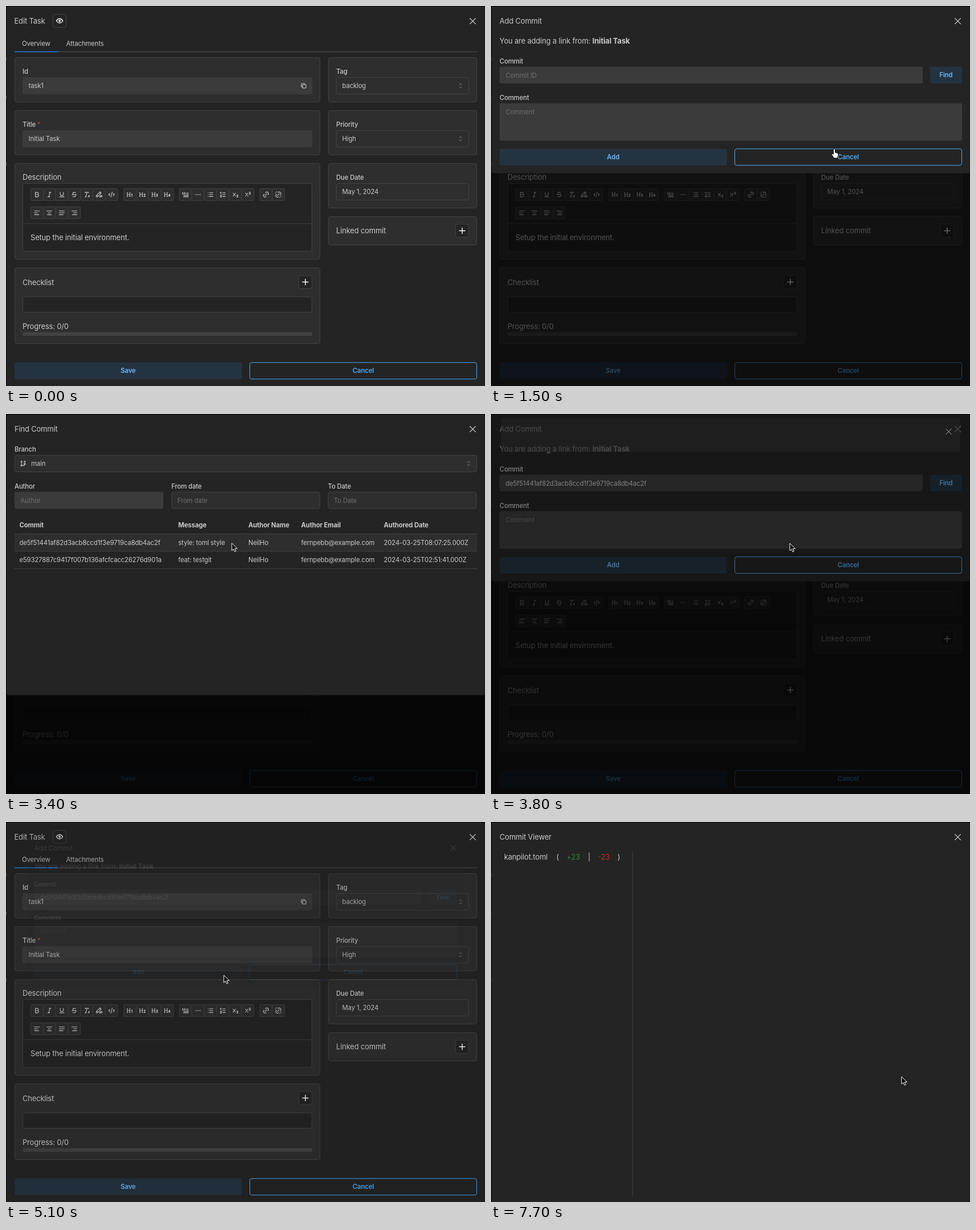
An HTML page for the animation above (8 s loop, 840 by 667 pixels).

```html
<!DOCTYPE html>
<html lang="en">
<head>
<meta charset="utf-8">
<title>Link a commit to a task</title>
<style>
  html, body { margin: 0; width: 100%; height: 100%; overflow: hidden; background: #0b0b0b; }
  svg { display: block; width: 100vw; height: 100vh; }
  text { font-family: Inter, sans-serif; letter-spacing: -.01em; white-space: pre; }
  .icon { fill: none; stroke-linecap: round; stroke-linejoin: round; }
  .btn rect { fill: #243341; }
  .btn.hover rect { fill: #24384b; }
  .btn.down { transform: translateY(1px); }
</style>
</head>
<body>
<svg id="stage" viewBox="0 0 840 667" preserveAspectRatio="none"></svg>
<script>
const C = { panel: '#242424', card: '#2e2e2e', field: '#3b3b3b', line: '#424242',
            text: '#c9c9c9', hint: '#6e6e6e', blue: '#4dabf7', sky: '#6bb7fa' };
const MD = 12.9, SM = 11.3;
const HASH = 'de5f51441af82d3acb8ccd1f3e9719ca8db4ac2f';

// Icons on a 24 unit grid
const H = 'M4 6v12M12 6v12M11 18h2M3 18h2M4 12h8M3 6h2M11 6h2';
const X = 'M5 7l8 10m-8 0l8-10';
const LINK = 'M9 15l6-6M11 6l.46-.54a5 5 0 0 1 7.07 7.07L18 13M13 18l-.4.53a5 5 0 0 1-7.07-7.07L6 11';
const ICONS = {
  bold: 'M7 5h6a3.5 3.5 0 0 1 0 7h-6zM13 12h1a3.5 3.5 0 0 1 0 7h-7v-7',
  italic: 'M11 5h6M7 19h6M14 5l-4 14',
  underline: 'M7 5v5a5 5 0 0 0 10 0v-5M5 19h14',
  strike: 'M5 12h14M16 6.5a4 2 0 0 0-4-1.5h-1a3.5 3.5 0 0 0 0 7h2a3.5 3.5 0 0 1 0 7h-1.5a4 2 0 0 1-4-1.5',
  clear: 'M17 15l4 4m0-4l-4 4M7 6V5h11v1M7 19h4M13 5L9 19',
  marker: 'M3 19h4L17.5 8.5a2.8 2.8 0 1 0-4-4L3 15zM12.5 5.5l4 4M4.5 13.5l4 4M21 15v4h-8l4-4z',
  code: 'M7 8l-4 4 4 4M17 8l4 4-4 4M14 4l-4 16',
  h1: H + 'M19 18v-8l-2 2',
  h2: H + 'M17 12a2 2 0 1 1 4 0c0 .6-.4 1-.8 1.6L17 18h4',
  h3: H + 'M19 14a2 2 0 1 0-2-2M17 16a2 2 0 1 0 2-2',
  h4: H + 'M20 18v-8l-4 6h5',
  quote: 'M6 15h15M21 19H6M15 11h6M21 7h-6M9 9h1a1 1 0 1 1-1 1V7.5a2 2 0 0 1 2-2M3 9h1a1 1 0 1 1-1 1V7.5a2 2 0 0 1 2-2',
  dash: 'M4 12h3M17 12h3M10.5 12h3',
  list: 'M9 6h11M9 12h11M9 18h11M5 6v.01M5 12v.01M5 18v.01',
  numbers: 'M11 6h9M11 12h9M12 18h8M4 16a2 2 0 1 1 4 0c0 .6-.5 1-1 1.5L4 20h4M6 10V4L4 6',
  sub: X + 'M21 20h-4l3.5-4a1.73 1.73 0 0 0-3.5-2',
  sup: X + 'M21 11h-4l3.5-4a1.73 1.73 0 0 0-3.5-2',
  link: LINK,
  unlink: LINK + 'M17 22v-2M20 17h2M2 7h2M7 2v2',
  left: 'M4 6h16M4 12h10M4 18h14',
  center: 'M4 6h16M8 12h8M6 18h12',
  justify: 'M4 6h16M4 12h16M4 18h12',
  right: 'M4 6h16M10 12h10M6 18h14',
  eye: 'M10 12a2 2 0 1 0 4 0a2 2 0 1 0-4 0M21 12q-3.6 6-9 6t-9-6q3.6-6 9-6t9 6',
  close: 'M18 6L6 18M6 6l12 12',
  plus: 'M12 5v14M5 12h14',
  copy: 'M8 10a2 2 0 0 1 2-2h8a2 2 0 0 1 2 2v8a2 2 0 0 1-2 2h-8a2 2 0 0 1-2-2zM16 8V6a2 2 0 0 0-2-2H6a2 2 0 0 0-2 2v8a2 2 0 0 0 2 2h2',
  select: 'M8 9l4-4 4 4M16 15l-4 4-4-4',
  branch: 'M5 18a2 2 0 1 0 4 0a2 2 0 1 0-4 0M5 6a2 2 0 1 0 4 0a2 2 0 1 0-4 0M15 6a2 2 0 1 0 4 0a2 2 0 1 0-4 0M7 8v8M9 18h6a2 2 0 0 0 2-2v-5M14 14l3-3 3 3',
  trash: 'M4 7h16M10 11v6M14 11v6M5 7l1 12a2 2 0 0 0 2 2h8a2 2 0 0 0 2-2l1-12M9 7V4a1 1 0 0 1 1-1h4a1 1 0 0 1 1 1v3',
  user: 'M3 12a9 9 0 1 0 18 0a9 9 0 1 0-18 0M9 10a3 3 0 1 0 6 0a3 3 0 1 0-6 0M6.2 18.8A4 4 0 0 1 10 16h4a4 4 0 0 1 3.8 2.8',
  empty: 'M13 9c4-.3 7-1.5 7-3 0-1.7-3.6-3-8-3-2 0-3.8.3-5.2.7M4.5 5C4.2 5.3 4 5.7 4 6c0 1.2 1.9 2.3 4.7 2.7M4 6v6c0 1.7 3.6 3 8 3l3-.2M19 13.3l1-1.3V6M4 12v6c0 1.7 3.6 3 8 3 3.2 0 6-.7 7.2-1.7M3 3l18 18'
};

// Drawing helpers; text is placed by its vertical middle
const text = (x, y, s, { size = SM, fill = C.text, weight = 400, anchor = 'start' } = {}) =>
  `<text x="${x}" y="${y + size * .36}" font-size="${size}" fill="${fill}" font-weight="${weight}" text-anchor="${anchor}">${s}</text>`;
const big = (x, y, s, fill) => text(x, y, s, { size: MD, fill });
const label = (x, y, s) => text(x, y, s, { weight: 500 });
const hint = (x, y, s) => text(x, y, s, { fill: C.hint });
const rect = (x, y, w, h, fill, stroke = 'none', r = 3.5) =>
  `<rect x="${x}" y="${y}" width="${w}" height="${h}" rx="${r}" fill="${fill}" stroke="${stroke}"/>`;
const bar = (x, y, w, h, fill = C.line) => rect(x, y, w, h, fill, 'none', 0);
const icon = (name, x, y, size, color = C.text, width = 1.1) =>
  `<path class="icon" d="${ICONS[name]}" stroke="${color}" stroke-width="${width * 24 / size}" transform="translate(${x - size / 2} ${y - size / 2}) scale(${size / 24})"/>`;
const group = (id, body, cls = '') => `<g id="${id}" class="${cls}">${body}</g>`;

const card = (x, y, w, h) => rect(x + .5, y + .5, w - 1, h - 1, C.card, C.line);
const well = (x, y, w, h) => rect(x + .5, y + .5, w - 1, h - 1, C.panel, C.line);
const field = (x, y, w, h = 30) => rect(x, y, w, h, C.field);
const action = (name, x, y, size = 17) =>
  rect(x - 11.5, y - 11.5, 23, 23, C.panel, C.line) + icon(name, x, y, size, '#fff', 1.4);
const closeX = icon('close', 818.5, 26.5, 20);
const select = (x, y, w, s, pad = 10.5) => card(x, y, w, 30) + text(x + pad, y + 15, s) +
  icon('select', x + w - 15, y + 15, 13, '#868686', 1);
const button = (id, x, y, w, s) => group(id,
  rect(x, y, w, 29.5, '', 'none') +
  text(x + w / 2, y + 14.8, s, { fill: C.sky, weight: 600, anchor: 'middle' }), 'btn');
const cancel = y => rect(427.5, y + .5, 398, 29, 'none', C.blue) +
  text(626.5, y + 14.8, 'Cancel', { fill: C.blue, weight: 600, anchor: 'middle' });

const tools = (x, y, names) => names.split(' ').map((name, i) => {
  const left = x + i * 21.8;
  return rect(left + .5, y + .5, 21.8, 21, C.card, C.line, 2) + icon(name, left + 11.3, y + 11, 13.3);
}).join('');

const editModal = () =>
  rect(1, 1, 838.5, 680, C.panel) +
  big(14.5, 26, 'Edit Task') + action('eye', 94, 26, 15) + closeX +
  text(28, 65.5, 'Overview') + text(105.5, 65.5, 'Attachments') +
  bar(15, 79.5, 811, 1.7) + bar(15, 79.5, 77, 1.7, '#1971c2') +
  card(15, 90, 536, 79) + label(29, 115, 'Id') + field(29, 125, 508) + text(39.5, 140, 'task1') + icon('copy', 522, 140, 12) +
  card(15, 183, 536, 79) + label(29, 208, 'Title <tspan fill="#e03131">*</tspan>') + field(29, 218, 508) + text(39.5, 233, 'Initial Task') +
  card(15, 276, 536, 169) + big(29, 300, 'Description') + well(29, 311, 508, 120) + bar(29, 381.5, 508, 1) +
  tools(43, 320, 'bold italic underline strike clear marker code') + tools(206, 320, 'h1 h2 h3 h4') +
  tools(303.5, 320, 'quote dash list numbers sub sup') + tools(444.5, 320, 'link unlink') +
  tools(43, 352, 'left center justify right') + big(43, 406.5, 'Setup the initial environment.') +
  card(15, 459, 536, 134) + big(29, 485, 'Checklist') + action('plus', 525, 484.5) +
  well(29, 510, 508, 28) + big(29, 562, 'Progress: 0/0') + rect(29, 572.5, 508, 6.5, C.line, 'none', 3) +
  card(565, 90, 261, 79) + label(579, 115, 'Tag') + select(579, 125, 233, 'backlog') +
  card(565, 183, 261, 79) + label(579, 208, 'Priority') + select(579, 218, 233, 'High') +
  card(565, 276, 261, 79) + label(579, 300.5, 'Due Date') + card(579, 311, 233, 30) + text(589.5, 326, 'May 1, 2024') +
  card(565, 369, 261, 51) +
  group('linked', card(565, 369, 261, 252) + well(579, 420, 233, 186) +
    `<circle cx="609" cy="450" r="16" fill="${C.card}"/>` + icon('user', 609, 450, 22, '#fff', 1.3) +
    text(638, 450, HASH.slice(0, 8) + '...', { size: 10 }) + action('trash', 786, 486, 15) +
    label(593, 517, 'Comment') + field(593, 527, 205, 65.5) + hint(603.5, 541, 'Comment')) +
  big(579, 394, 'Linked commit') + action('plus', 800, 394.5) +
  group('foot', button('save', 15, 625.5, 398.5, 'Save') + cancel(625.3));

const addModal = () =>
  rect(1, 1, 838.5, 292.5, C.panel) + big(15, 26.5, 'Add Commit') + closeX +
  big(15, 61.5, 'You are adding a link from: <tspan font-weight="700">Initial Task</tspan>') +
  label(15, 97, 'Commit') + field(15, 106.5, 742, 29.5) +
  group('blank', hint(25.5, 121.5, 'Commit ID')) + group('filled', text(25.5, 121.5, HASH)) +
  button('find-btn', 770, 106.5, 56, 'Find') +
  label(15, 161, 'Comment') + field(15, 170.5, 811, 66) + hint(25.5, 185.5, 'Comment') +
  button('add-btn', 15, 250.5, 398.5, 'Add') + cancel(250.2);

const columns = [23.5, 302, 425, 517.5, 662.5];
const row = (y, cells, style) => cells.map((s, i) => text(columns[i], y, s, style)).join('');
const findModal = () =>
  group('find-body', rect(1, 1, 838.5, 492.5, C.panel) + big(15, 26.5, 'Find Commit') +
    label(15, 62, 'Branch') + select(15, 72, 811, 'main', 29) + icon('branch', 30, 87, 13.5) +
    label(15, 126.5, 'Author') + field(15, 136.5, 261) + hint(25.5, 151.5, 'Author') +
    label(290, 126.5, 'From date') + card(290, 136.5, 261, 30) + hint(300.5, 151.5, 'From date') +
    label(564.5, 126.5, 'To Date') + card(564.5, 136.5, 261, 30) + hint(575, 151.5, 'To Date') +
    row(194.5, ['Commit', 'Message', 'Author Name', 'Author Email', 'Authored Date'], { weight: 700 }) +
    bar(15, 210, 811, 30.5, C.card) + bar(15, 210, 811, 1) + bar(15, 240.5, 811, 1) + bar(15, 271, 811, 1) +
    row(225.5, [HASH, 'style: toml style', 'NeilHo', 'fernpebb@example.com', '2024-03-25T08:07:25.000Z']) +
    row(256.3, ['e59327887c9417f007b136afcfcacc26276d901a', 'feat: testgit', 'NeilHo', 'fernpebb@example.com', '2024-03-25T02:51:41.000Z']) +
    group('none', `<circle cx="420" cy="334.5" r="18.5" fill="${C.field}"/>` + icon('empty', 420, 334.5, 21, '#a0a0a0', 1.3) +
      text(420, 365.5, 'No records', { fill: '#a0a0a0', anchor: 'middle' }))) +
  group('find-bare', rect(1, 1, 838.5, 63, C.panel)) + closeX;

const viewModal = () =>
  rect(1, 1, 838.5, 680, C.panel) + big(15, 26.5, 'Commit Viewer') + closeX +
  group('diff', big(23, 61.5, 'kanpilot.toml') + big(114.5, 61.5, '(') + big(132.5, 61.5, '+23', '#2b8a3e') +
    big(170, 61.5, '|') + big(187.5, 61.5, '-23', '#c92a2a') + big(222, 61.5, ')') + bar(247.8, 51, 1, 605));

const layer = (id, body) =>
  `<rect id="${id}-shade" width="840" height="667"/>` + group(id, body);

document.getElementById('stage').innerHTML =
  bar(0, 0, 840, 667, '#0b0b0b') + [93, 160, 278].map(y => bar(0, y - 3, 1, 6, '#444')).join('') +
  editModal() + layer('add', addModal()) + layer('find', findModal()) + layer('view', viewModal()) +
  group('cursor',
    `<path id="arrow" d="M0 0v13l3-2.8 2 4.8 2.2-.9-2-4.7h4.2z" fill="#000" stroke="#fff"/>
     <path id="hand" d="M-1.5 0a1.5 1.5 0 0 1 3 0V5l3.5.9q2.2.5 2 2.6l-.7 3.5-1 3H-.5L-4.3 9.3a1.3 1.3 0 0 1 1.9-1.7l.9.9z" fill="#fff" stroke="#000" stroke-width=".9"/>`);

const el = id => document.getElementById(id);
const show = (id, on) => { el(id).style.display = on ? '' : 'none'; };

// The picture advances in ticks of 100 ms
const TICK = 100, TICKS = 80;
const RISE = [.15, .5, .85], FALL = [.6, .15];
const level = (n, open, shut = Infinity) =>
  n < open ? 0 : n < shut ? RISE[n - open] ?? 1 : FALL[n - shut] ?? 0;

function pop(id, p, height) {
  const mid = 1 + height / 2, s = .9 + .1 * p;
  show(id, p > 0);
  el(id).setAttribute('opacity', p);
  el(id).setAttribute('transform', `translate(420 ${mid + 10 * (1 - p)}) scale(${s}) translate(-420 ${-mid})`);
  el(id + '-shade').setAttribute('opacity', .6 * p);
}

// Pointer path: tick, x, y
const PATH = [
  [2, 203, 600], [4, 600, 500], [6, 799, 396], [12, 799, 396], [15, 602, 252], [17, 222, 150],
  [19, 500, 128], [21, 795, 131], [27, 795, 131], [30, 360, 212], [32, 140, 226], [35, 524, 227],
  [42, 524, 227], [47, 382, 269], [61, 382, 269], [62, 462, 331], [66, 610, 410], [70, 720, 447], [80, 720, 447]
];
const HANDS = [[6, 8], [15, 15], [21, 23], [46, 50]];

function pointer(n) {
  show('cursor', n >= 2);
  const i = PATH.findIndex(p => p[0] > n);
  if (i < 1) return;
  const [t0, x0, y0] = PATH[i - 1], [t1, x1, y1] = PATH[i];
  const k = (n - t0) / (t1 - t0);
  const hand = HANDS.some(([from, to]) => n >= from && n <= to);
  el('cursor').setAttribute('transform', `translate(${x0 + (x1 - x0) * k} ${y0 + (y1 - y0) * k})`);
  show('hand', hand);
  show('arrow', !hand);
}

function press(id, n, from, down) {
  el(id).classList.toggle('hover', n >= from && n <= down);
  el(id).classList.toggle('down', n === down);
}

function draw(n) {
  const closing = n >= 38, linked = n >= 52;
  pop('add', level(n, 8, 50), 292.5);
  pop('find', level(n, 23, 38), closing ? 63 : 492.5);
  pop('view', level(n, 71), 680);
  show('find-body', !closing);
  show('find-bare', closing);
  show('none', n < 26);
  show('blank', !closing);
  show('filled', closing);
  show('linked', linked);
  show('diff', n >= 75);
  el('foot').setAttribute('transform', `translate(0 ${linked ? 9.2 : 0})`);
  press('find-btn', n, 21, 22);
  press('add-btn', n, 46, 49);
  pointer(n);
}

let last = -1;
function loop(now) {
  const n = Math.floor(now / TICK) % TICKS;
  if (n !== last) draw(last = n);
  requestAnimationFrame(loop);
}
draw(0);
requestAnimationFrame(loop);
</script>
</body>
</html>
```
